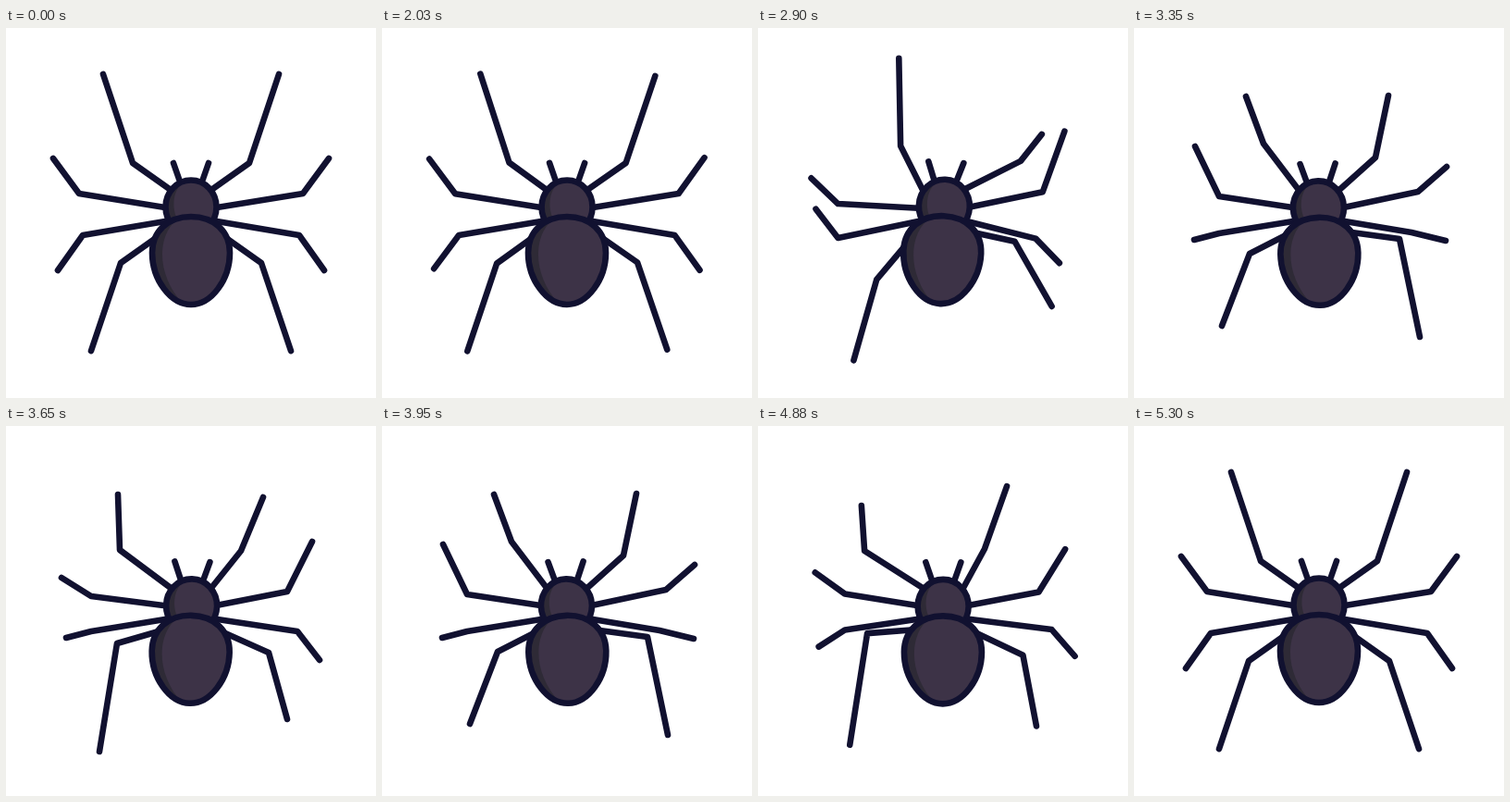
An HTML page for the animation above (5330 ms loop, 400 px wide and 400 px high).

```html
<!DOCTYPE html>
<html lang="en">
<head>
<meta charset="utf-8">
<title>Spider</title>
<style>
  html, body { margin: 0; height: 100%; overflow: hidden; background: #fff; }
  svg { display: block; width: 100vw; height: 100vh; }
</style>
</head>
<body>
<svg viewBox="0 0 400 400" fill="none" stroke="#111130" stroke-width="6.6" stroke-linecap="round" stroke-linejoin="round">
  <defs>
    <clipPath id="headClip"><ellipse cx="200" cy="193.5" rx="27.5" ry="29"/></clipPath>
    <clipPath id="bellyClip"><path d="M200 204C225 204 242 220 242 243C242 272 222 299 200 299C178 299 158 272 158 243C158 220 175 204 200 204Z"/></clipPath>
  </defs>
  <g id="legs"></g>
  <g id="body">
    <path d="M181 146L188 166M219 146L212 166"/>
    <g clip-path="url(#headClip)" stroke="none">
      <path fill="#2e2a36" d="M160 150h80v80h-80z"/>
      <path fill="#3d3347" d="M198 164C178 170 178 200 188 210L240 230V150Z"/>
    </g>
    <ellipse cx="200" cy="193.5" rx="27.5" ry="29"/>
    <g clip-path="url(#bellyClip)" stroke="none">
      <path fill="#2e2a36" d="M150 200h100v105h-100z"/>
      <path fill="#3d3347" d="M192 203C164 215 158 265 194 301L250 305V200Z"/>
    </g>
    <path d="M200 204C225 204 242 220 242 243C242 272 222 299 200 299C178 299 158 272 158 243C158 220 175 204 200 204Z"/>
  </g>
</svg>
<script>
const LOOP = 5330, STEP = 30, START = 2000, END = 5300, FADE = 300, STRIDE = 600;

// Joint data is [kneeX, kneeY, footX, footY]; the right side is stored mirrored.
// Each side lists three stride poses: early swing, mid swing, mid return.
const LEGS = [
  { hip: [178, 175], rest: [137, 146, 105, 50], sides: [
    [[121, 141, 106, 97], [140, 125, 121, 74], [123, 134, 121, 74]],
    [[145, 132, 137, 54], [139, 140, 125, 73], [146, 135, 122, 77]]] },
  { hip: [178, 195], rest: [79, 179, 51, 141], sides: [
    [[93, 179, 69, 116], [92, 182, 66, 128], [92, 184, 60, 164]],
    [[87, 190, 58, 167], [93, 177, 62, 150], [96, 179, 69, 125]]] },
  { hip: [178, 208], rest: [83, 224, 56, 262], sides: [
    [[93, 228, 70, 254], [92, 222, 65, 229], [92, 222, 65, 229]],
    [[87, 227, 65, 215], [100, 221, 63, 230], [85, 222, 61, 253]]] },
  { hip: [172, 220], rest: [124, 254, 92, 349], sides: [
    [[124, 240, 92, 311], [125, 244, 95, 322], [120, 235, 101, 352]],
    [[126, 266, 103, 360], [113, 228, 91, 334], [116, 245, 96, 317]]] }
];

const { sin, cos, PI, min, max, floor } = Math;
const A = PI / 10;
const clamp = (x, lo, hi) => max(lo, min(hi, x));
const smooth = x => x * x * (3 - 2 * x);
const legGroup = document.getElementById("legs");
const body = document.getElementById("body");

const limbs = LEGS.flatMap(leg => [0, 1].map(side => {
  const path = document.createElementNS("http://www.w3.org/2000/svg", "path");
  if (side) path.setAttribute("transform", "matrix(-1 0 0 1 400 0)");
  legGroup.append(path);
  const [early, mid, back] = leg.sides[side];
  // The opposite leg walks half a stride later.
  return { path, leg, poses: [early, mid, leg.sides[1 - side][0], back] };
}));

// Periodic curve through four values at angles -A, A, PI - A and PI + A.
function curve([v1, v2, v3, v4], angle, sharp) {
  const wave = x => sin(x) + sharp * sin(3 * x);
  const rise = v2 - v1, fall = v3 - v4;
  return (v1 + v2 + v3 + v4) / 4
    + (v1 + v2 - v3 - v4) / 4 * cos(angle) / cos(A)
    + (rise + fall) / 4 * wave(angle) / wave(A)
    + (rise - fall) / 4 * sin(2 * angle) / sin(2 * A);
}

function draw(time) {
  const t = floor((time + 10) / STEP) * STEP - 10;
  const weight = smooth(clamp(min(t - START, END - t) / FADE, 0, 1));
  const angle = 2 * PI * (clamp(t, START + FADE, END - FADE) - 2120) / STRIDE;

  for (const { path, leg, poses } of limbs) {
    const joints = leg.rest.map((rest, i) => {
      const walk = curve(poses.map(p => p[i]), angle, i < 2 ? 0.15 : -0.05);
      return (rest + (walk - rest) * weight).toFixed(2);
    });
    path.setAttribute("d", `M${leg.hip}L${joints}`);
  }

  const tilt = weight * (2 * sin(angle) - 1.75 * cos(angle));
  const bob = weight * 1.4 * sin(2 * angle);
  body.setAttribute("transform", `translate(0 ${bob}) rotate(${tilt} 200 225)`);
}

const begin = performance.now();
function tick() {
  draw((performance.now() - begin) % LOOP);
  requestAnimationFrame(tick);
}
tick();
</script>
</body>
</html>
```
